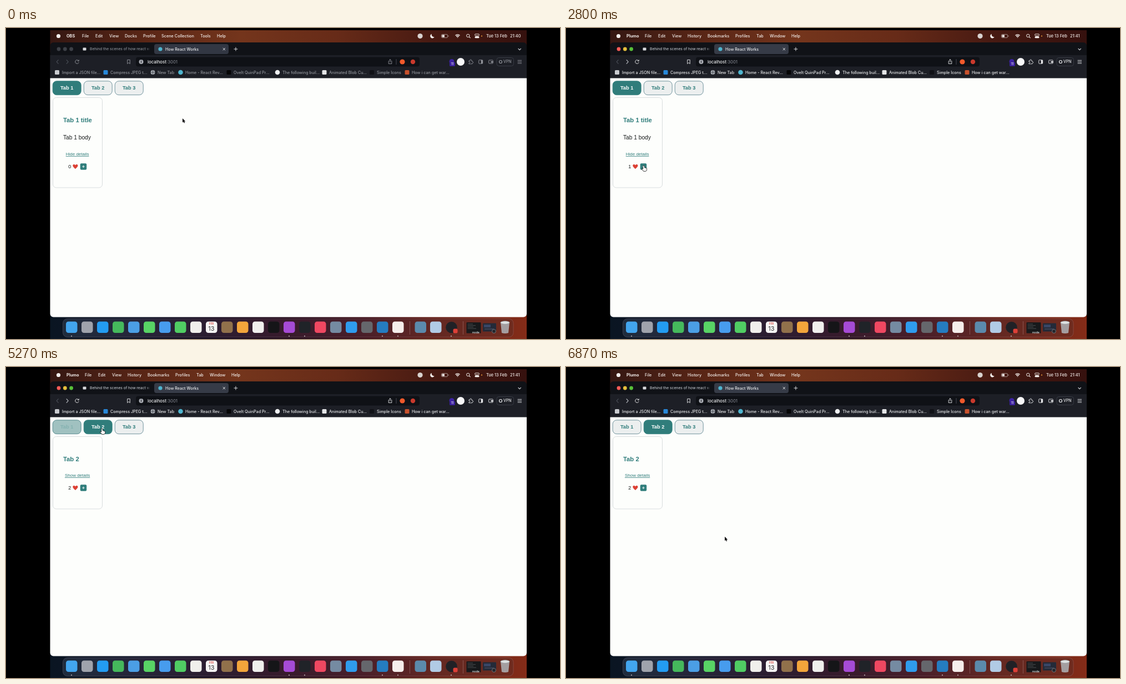
Recreate the animation shown at these times as an HTML page with a canvas. Size 998 by 561 pixels, loop 6910 ms.

```html
<!DOCTYPE html>
<html lang="en">
<head>
<meta charset="utf-8">
<title>How React Works</title>
<style>
html, body { margin: 0; width: 100%; height: 100%; overflow: hidden; background: #000; }
canvas { display: block; }
</style>
</head>
<body>
<canvas id="stage" width="998" height="561"></canvas>
<script>
const ctx = document.getElementById('stage').getContext('2d');
const LOOP = 6910;
const LEFT = 79.5, WIDE = 858.5;
const UI = 'Inter, sans-serif';
const PAGE = '"Liberation Sans", Arial, sans-serif';
const TEAL = [48, 125, 123], PALE = [236, 239, 239], WHITE = [255, 255, 255], EDGE = [98, 136, 148];

// Moments of the recorded session, in ms
const FOCUS = 420, MINUTE = 1330, LIKES = [2480, 2860], FOLD = 4020, HOVER = 4800, PICK = 5130, FADE = 250;

// Pointer tip: time, x, y
const PATH = [
  [0, 318, 163], [420, 316, 163], [830, 315, 164], [1400, 315, 164], [1830, 161, 194],
  [2200, 140, 249], [3050, 140, 249], [3550, 136, 231], [4300, 136, 231],
  [4820, 173, 112], [5310, 173, 112], [5640, 286, 306]
];

const clamp = v => Math.max(0, Math.min(1, v));
const smooth = v => v * v * (3 - 2 * v);
const mix = (a, b, k) => `rgb(${a.map((v, i) => Math.round(v + (b[i] - v) * k))})`;

function text(s, x, y, size, color, weight = 500, font = UI, align = 'left') {
  ctx.font = `${weight} ${size}px ${font}`;
  ctx.fillStyle = color;
  ctx.textAlign = align;
  ctx.fillText(s, x, y + size * 0.36);
}

function box(x, y, w, h, r, fill, stroke, width = 1) {
  ctx.beginPath();
  ctx.roundRect(x, y, w, h, r);
  if (fill) { ctx.fillStyle = fill; ctx.fill(); }
  if (stroke) { ctx.strokeStyle = stroke; ctx.lineWidth = width; ctx.stroke(); }
}

function disc(x, y, r, fill, stroke, width = 1) {
  ctx.beginPath();
  ctx.arc(x, y, r, 0, 7);
  if (fill) { ctx.fillStyle = fill; ctx.fill(); }
  if (stroke) { ctx.strokeStyle = stroke; ctx.lineWidth = width; ctx.stroke(); }
}

function line(color, width, ...pts) {
  ctx.beginPath();
  for (let i = 0; i < pts.length; i += 2) ctx.lineTo(pts[i], pts[i + 1]);
  ctx.strokeStyle = color;
  ctx.lineWidth = width;
  ctx.stroke();
}

function shape(d, x, y, fill, stroke, width = 1, scale = 1) {
  const p = new Path2D(d);
  ctx.save();
  ctx.translate(x, y);
  ctx.scale(scale, scale);
  if (stroke) { ctx.strokeStyle = stroke; ctx.lineWidth = width; ctx.lineJoin = 'round'; ctx.stroke(p); }
  if (fill) { ctx.fillStyle = fill; ctx.fill(p); }
  ctx.restore();
}

function across(x0, x1, ...colors) {
  const g = ctx.createLinearGradient(x0, 0, x1, 0);
  colors.forEach((c, i) => g.addColorStop(i / (colors.length - 1), c));
  return g;
}

function desktop() {
  ctx.fillStyle = '#000';
  ctx.fillRect(0, 0, 998, 561);
  ctx.fillStyle = across(80, 938, '#351712', '#5a2616', '#74351c', '#672b18', '#481a12', '#35110e');
  ctx.fillRect(LEFT, 4, WIDE, 40);
  ctx.fillStyle = across(80, 938, '#0a1522', '#101629', '#190f22', '#28101f', '#42141c', '#6a2217', '#842c18');
  ctx.fillRect(LEFT, 500, WIDE, 61);
}

function menuBar(t) {
  const c = '#f4efec', on = t >= FOCUS, y = 14.5;
  disc(94.5, y, 3.6, c);
  const items = on
    ? [['Plumo', 109], ['File', 142], ['Edit', 166], ['View', 191], ['History', 219], ['Bookmarks', 255], ['Profiles', 305], ['Tab', 343], ['Window', 367], ['Help', 406]]
    : [['OBS', 109], ['File', 137], ['Edit', 161], ['View', 186], ['Docks', 214], ['Profile', 247], ['Scene Collection', 280], ['Tools', 350], ['Help', 380]];
  items.forEach(([s, x], i) => text(s, x, y, 7.3, c, i ? 500 : 700));

  disc(746, y, 4.6, '#d8d2cf');
  shape('M-1.2-3.8A4 4 0 1 0 3.8 1.6A4.3 4.3 0 0 1-1.2-3.8Z', 768, y, c);
  box(784.5, y - 3, 11, 6, 1.6, null, '#b9aba6', 0.8);
  box(785.5, y - 2, 4.5, 4, 0.8, c);
  box(796.5, y - 1, 1, 2, 0.5, '#b9aba6');
  for (let i = 0; i < 3; i++) {
    ctx.beginPath();
    ctx.arc(813.5, y + 3.5, 1 + i * 2.5, -2.3, -0.84);
    ctx.strokeStyle = c;
    ctx.lineWidth = 1.5;
    ctx.stroke();
  }
  disc(832.3, y - 0.6, 2.7, null, c, 1);
  line(c, 1.1, 834.3, y + 1.4, 836.6, y + 3.7);
  box(844.5, y - 3.6, 8, 3, 1.5, null, c, 0.9);
  box(844.5, y + 0.6, 8, 3.2, 1.6, c);
  disc(857, y, 1.1, '#f09a37');
  text('Tue 13 Feb', 865, y, 7.4, c);
  text(t < MINUTE ? '21:40' : '21:41', 908, y, 7.4, c);
}

function browser(t) {
  const on = t >= FOCUS;
  const fg = on ? '#e9eaec' : '#92959c', dim = on ? '#b9bdc4' : '#8b8f97';
  box(LEFT, 26, WIDE, 495, 6, '#101217');
  ctx.fillStyle = '#1d1f26';
  ctx.fillRect(LEFT, 49, WIDE, 42);

  ['#fc5b57', '#e5bf3c', '#57c038'].forEach((c, i) => disc(95 + i * 11.3, 38, 3.4, on ? c : '#3d4047'));
  box(138.5, 35.5, 6, 5, 1, '#d7d9dc');
  ctx.save();
  ctx.beginPath();
  ctx.rect(150, 28, 109, 20);
  ctx.clip();
  text('Behind the scenes of how react works', 151, 38, 6.7, dim);
  ctx.restore();
  const fade = ctx.createLinearGradient(251, 0, 260, 0);
  fade.addColorStop(0, 'rgba(16,18,23,0)');
  fade.addColorStop(1, '#101217');
  ctx.fillStyle = fade;
  ctx.fillRect(251, 30, 9, 16);
  box(267, 29, 134, 18, 4, on ? '#363b47' : '#323743');
  disc(278, 38, 3.6, '#4fb5cf');
  text('How React Works', 287, 38, 7.1, '#eceef0');
  line('#e4e6e9', 1, 390.7, 36, 394.9, 40.2);
  line('#e4e6e9', 1, 394.9, 36, 390.7, 40.2);
  line('#d5d7da', 1, 410.5, 38, 417.3, 38);
  line('#d5d7da', 1, 413.9, 34.6, 413.9, 41.4);
  line('#c9cbd0', 1.1, 922.6, 37, 925.2, 39.6, 927.8, 37);

  // Address row
  line('#4d515a', 1.1, 94.5, 57.4, 91.2, 61, 94.5, 64.6);
  line(on ? '#c4c7cd' : '#4d515a', 1.1, 108.8, 57.4, 112.1, 61, 108.8, 64.6);
  ctx.beginPath();
  ctx.arc(128, 61, 3.2, 0.3, 5.6);
  ctx.strokeStyle = fg;
  ctx.lineWidth = 1;
  ctx.stroke();
  line(fg, 1, 131.2, 57.4, 131.2, 59.6, 129, 59.6);
  shape('M-2.3-3.6H2.3V3.6L0 1.5-2.3 3.6Z', 221, 61, null, fg, 0.9);
  box(234, 52.5, 511, 17, 4, '#0f1116');
  disc(243.5, 61, 4, '#a4a7ae');
  text('i', 243.5, 61, 6, '#0f1116', 700, UI, 'center');
  text('localhost', 255, 61, 7.8, '#eceef0');
  const host = ctx.measureText('localhost').width;
  text(':3001', 255 + host, 61, 7.8, '#8b8f98', 400);
  line(fg, 0.9, 690.2, 59.5, 689.2, 59.5, 689.2, 64.5, 694.8, 64.5, 694.8, 59.5, 693.8, 59.5);
  line(fg, 0.9, 690.3, 58.2, 692, 56.5, 693.7, 58.2);
  line(fg, 0.9, 692, 56.5, 692, 62);
  line('#454952', 1, 703, 56, 703, 66);
  disc(714, 61, 4.6, '#f0592b');
  disc(733, 61, 4.2, '#c9392c');

  disc(803, 60.5, 4.5, '#3c22a0');
  box(799, 61.5, 10, 7.5, 1.5, '#3a1f9c');
  text('11', 804, 65.2, 6, '#e8e5f6', 500, UI, 'center');
  disc(819, 61, 7, '#f7f7f8');
  shape('M-3.3-2H-1A1.3 1.3 0 1 1 1-2H2.6V0A1.3 1.3 0 1 1 2.6 2.2V3.8H-3.3V2.2A1.3 1.3 0 1 0-3.3 0Z', 837.2, 61, null, fg, 0.8);
  box(851.7, 57.7, 7, 6.6, 1, null, fg, 0.9);
  box(855.8, 58, 3, 6, 0.5, fg);
  box(869.7, 58, 7.5, 6, 1, null, fg, 0.9);
  box(873.5, 60, 4, 2.4, 0.5, fg);
  box(884, 53.5, 30.5, 15, 4, null, '#3b3f48', 0.9);
  disc(891, 61, 2.5, null, fg, 1.2);
  text('VPN', 896, 61, 6.9, fg);
  for (let i = 0; i < 3; i++) line(fg, 0.9, 921.6, 58.4 + i * 2.7, 929, 58.4 + i * 2.7);

  // Bookmarks
  const marks = [
    [92, 101, 'Import a JSON file...', '#c9cbd0'], [179.5, 188, 'Compress JPEG t...', '#2888d8'],
    [264.5, 273, 'New Tab', 'globe'], [314.5, 323, 'Home - React Rev...', '#4fb5cf'],
    [401.5, 410, 'Ovelt QuinPad Pr...', '#050506'], [489, 498, 'The following buil...', '#eef0f2'],
    [573.5, 582, 'Animated Blob Cu...', '#e4e5e7'], [659, 668, 'Simple Icons', '#101116'],
    [722.5, 731, 'How i can get war...', '#c7512d']
  ];
  marks.forEach(([ix, tx, s, c], i) => {
    if (c === 'globe') {
      disc(ix, 80, 3.9, '#a9adb4');
      line('#363a43', 0.8, ix - 3.6, 80, ix + 3.6, 80);
      line('#363a43', 0.8, ix, 76.3, ix, 83.7);
    } else if (i === 3 || i === 5) disc(ix, 80, 4.3, c);
    else box(ix - 4, 76, 8, 8, 1.5, c);
    text(s, tx, 80, 7.2, fg);
  });

  box(LEFT, 90.5, WIDE, 430.9, [0, 0, 6, 6], '#fdfefc');
}

function tabButton(label, x, k) {
  box(x + 0.2, 95.8, 51, 24.9, 7, mix(PALE, TEAL, k), mix(EDGE, TEAL, k), 0.9);
  text(label, x + 25.6, 108, 9.2, mix(TEAL, WHITE, k), 700, PAGE, 'center');
}

function page(t) {
  const second = t >= PICK, open = t < FOLD;
  tabButton('Tab 1', 84, 1 - smooth(clamp((t - PICK) / FADE)));
  tabButton('Tab 2', 140, smooth(clamp((t - HOVER) / FADE)));
  tabButton('Tab 3', 196, 0);

  const teal = mix(TEAL, TEAL, 0), lift = open ? 0 : 32;
  box(84.5, 125.5, 89, 162.5 - lift, 6, null, '#d5dadb', 0.9);
  text(second ? 'Tab 2' : 'Tab 1 title', 103, 165.5, 11.3, teal, 700, PAGE);
  if (open) text('Tab 1 body', 103, 197, 10.2, '#171b1b', 400, PAGE);

  const link = open ? 'Hide details' : 'Show details', ly = 227.5 - lift;
  text(link, 128.6, ly, 8, teal, 400, PAGE, 'center');
  const half = ctx.measureText(link).width / 2;
  line(teal, 0.8, 128.6 - half, ly + 4, 128.6 + half, ly + 4);

  const y = 250 - lift;
  text(String(LIKES.filter(v => t >= v).length), 112.2, y, 9, '#171b1b', 400, PAGE);
  shape('M0 4.2C-2 1.8-4.6.6-4.6-1.8C-4.6-4.6-1-4.6 0-2.4C1-4.6 4.6-4.6 4.6-1.8C4.6.6 2 1.8 0 4.2Z', 124.9, y, '#dc4034');
  box(133.7, y - 5.8, 11.5, 11.6, 2, teal);
  line('#eaf3f2', 1, 137.2, y, 141.7, y);
  line('#eaf3f2', 1, 139.45, y - 2.2, 139.45, y + 2.2);
}

function dock() {
  box(102.5, 524.5, 811.5, 33, 8, across(102, 914, '#1f2c3d', '#262539', '#2c1d30', '#381b2c', '#4a1f29', '#642822', '#6f2b1e'), 'rgba(190,170,180,.28)', 0.8);
  const apps = ['#42a5ee', '#9fa3ac', '#239cf2', '#45b95c', '#4b9ee5', '#58d365', '#479cee', '#50cd63',
    '#f0efec', '#f6f5f4', '#91714b', '#f3a53b', '#f0efed', '#151518', '#a64bd5', '#202328',
    '#ef4861', '#758ba2', '#2f9ced', '#65676c', '#257cc0', '#f5eeeb'];
  apps.forEach((c, i) => box(108 + i * 28, 529.5, 20.5, 20.5, 4.6, c));
  text('FEB', 370, 533.8, 4.5, '#dd4b42', 600, UI, 'center');
  text('13', 370, 542.5, 11, '#313235', 400, UI, 'center');
  line('rgba(225,200,205,.35)', 0.8, 727.5, 529, 727.5, 553);
  box(736.5, 529.5, 20.5, 20.5, 4.6, '#5b8aac');
  box(764, 529.5, 20.5, 20.5, 4.6, '#b1cbe5');
  disc(802.5, 540, 10.3, '#202126');
  box(805.5, 542.5, 8, 8, 2.5, '#dd4038');
  line('rgba(225,200,205,.35)', 0.8, 823.5, 529, 823.5, 553);

  // Minimised windows
  box(829.5, 531, 26, 19.5, 1, '#17191b');
  for (let i = 0; i < 4; i++) line('#626669', 0.7, 831.5, 534 + i * 2.7, 841 + (i * 5) % 9, 534 + i * 2.7);
  text('node', 846.5, 549, 5.4, '#f4f4f4', 500, UI, 'center');
  box(859, 532.5, 24, 15, 1, '#242a38');
  box(861, 535, 12, 5, 0, '#384665');
  line('#66738d', 0.7, 862, 543, 879, 543);
  disc(879, 547, 3.5, '#24262b', '#8f9093', 0.7);

  // Bin
  shape('M-8-9H8L6 10Q0 12-6 10Z', 899, 540, 'rgba(181,187,191,.82)');
  ctx.beginPath();
  ctx.ellipse(899, 531.5, 8.2, 2.8, 0, 0, 7);
  ctx.fillStyle = '#dfe2e2';
  ctx.fill();
  ctx.strokeStyle = '#8c9498';
  ctx.lineWidth = 0.8;
  ctx.stroke();
  for (let i = -1; i < 2; i++) line('#8d969a', 0.6, 899 + i * 4, 536, 899 + i * 3, 549);
  [118, 510, 538, 678, 706, 802].forEach(x => disc(x, 555.7, 0.9, '#d8d2d4'));
}

function pointer(t) {
  let i = PATH.length - 1;
  while (PATH[i][0] > t) i--;
  const a = PATH[i], b = PATH[i + 1] || a;
  const k = b === a ? 0 : smooth((t - a[0]) / (b[0] - a[0]));
  const x = a[1] + (b[1] - a[1]) * k, y = a[2] + (b[2] - a[2]) * k;
  const lift = t < FOLD ? 0 : 32;
  const inside = (l, top, r, bottom) => x >= l && x <= r && y >= top && y <= bottom;
  const hand = inside(84, 96, 135, 121) || inside(140, 96, 191, 121) || inside(196, 96, 247, 121) ||
    inside(107, 223 - lift, 151, 232 - lift) || inside(134, 244 - lift, 145, 256 - lift);
  if (hand) shape('M-1 0Q0-1 1 0V3.5Q2.2 2.8 2.8 4Q4 3.5 4.5 4.6Q6 4.4 6 6V7.5Q5.8 9.6 4.2 10.2H0L-3.6 6.2Q-3.2 4.8-1 6.4Z', x, y, '#fff', '#151515', 1.5, 0.88);
  else shape('M0 0V8.1L1.9 6.4 3.1 9.2 4.5 8.6 3.3 5.9H5.7Z', x, y, '#050505', '#fff', 1.1, 0.92);
}

function draw(now) {
  const t = now % LOOP;
  desktop();
  menuBar(t);
  browser(t);
  page(t);
  dock();
  pointer(t);
  requestAnimationFrame(draw);
}
draw(0);
</script>
</body>
</html>
```
